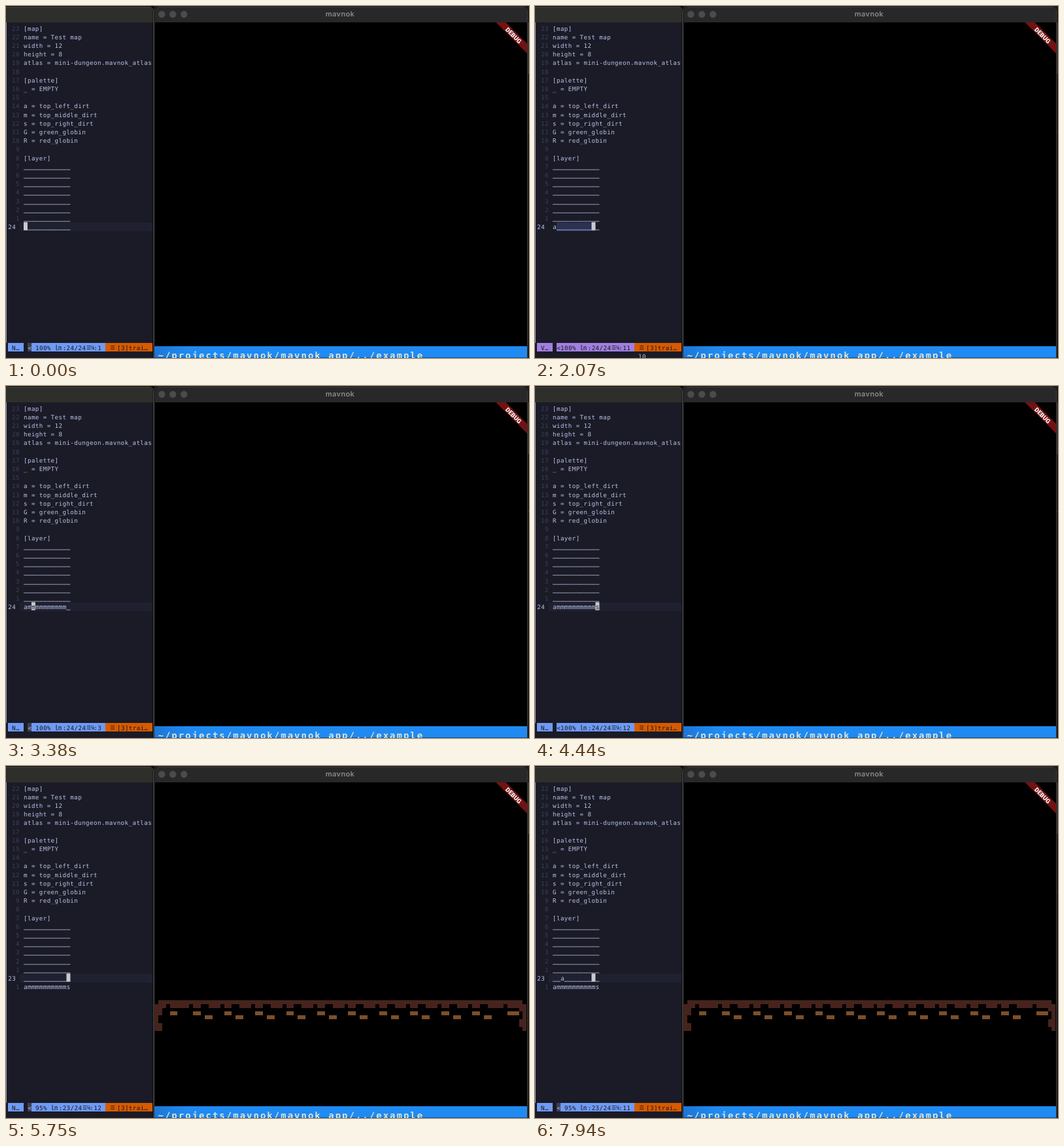
An HTML page for the animation above (8000 ms loop, 800x538 px).

```html
<!DOCTYPE html>
<html lang="en">
<head>
<meta charset="utf-8">
<style>
  html, body { margin: 0; width: 100%; height: 100%; overflow: hidden; background: #08080a; }
  svg { display: block; width: 800px; height: 538px; }
  text { white-space: pre; text-rendering: geometricPrecision; }
  .code { font: 9.2px "DejaVu Sans Mono", monospace; letter-spacing: .413px; }
  .cells { font: 9.92px "Noto Sans Mono", monospace; }
  .icon { font: 8px "DejaVu Sans Mono", monospace; }
  .wide { font: 10.5px "Noto Sans CJK JP", "Noto Sans CJK", sans-serif; }
  .title { font: 600 11px Inter, sans-serif; letter-spacing: .35px; }
  .flag { font: 900 9.4px Roboto, sans-serif; }
  .path { font: bold 14px "DejaVu Sans Mono", monospace; letter-spacing: 2px; }
</style>
</head>
<body>
<svg id="stage" viewBox="0 0 800 538">
  <linearGradient id="strip">
    <stop offset="0" stop-color="#1c76d6"/>
    <stop offset=".09" stop-color="#1f8af2"/>
  </linearGradient>
</svg>
<script>
const LOOP = 8000, CELL = 5.952, LINE = 13.2, LEFT = 27, COLS = 12;
const INK = '#b9c2ea', DIM = '#3b4060', BLUE = '#6f9af5', PURPLE = '#a17fe0', DARK = '#15161e';
const NS = 'http://www.w3.org/2000/svg';
const stage = document.getElementById('stage');

function add(tag, attrs, text, parent = stage) {
  const el = document.createElementNS(NS, tag);
  set(el, attrs);
  if (text !== undefined) el.textContent = text;
  return parent.appendChild(el);
}
function set(el, attrs) {
  for (const k in attrs) el.setAttribute(k, attrs[k]);
}
const box = (x, y, width, height, fill, parent) =>
  add('rect', { x, y, width, height, fill }, undefined, parent);
const label = (x, y, text, fill = INK, cls = 'code') =>
  add('text', { x, y, fill, class: cls }, text);
const baseline = row => 37.6 + row * LINE;
const colX = col => LEFT + (col - 1) * CELL;

// Editor window
add('path', { d: 'M0 1.5H219Q224.5 1.5 224.5 7V25H0Z', fill: '#2e2f2b' });
add('path', { d: 'M0 1.5H219Q225.5 1.5 225.5 8V538', fill: 'none', stroke: '#444446' });
box(0, 25, 224, 513, '#1a1b26');
box(0, 25, 1, 490, '#8f98c0');

const lineBg = box(21, 0, 203, LINE, '#1f2130');
const selection = box(colX(2), 0, 0, LINE, '#2b3150');
const BLANK = '_'.repeat(COLS);
const lines = [
  '[map]', 'name = Test map', 'width = 12', 'height = 8',
  'atlas = mini-dungeon.mavnok_atlas', '', '[palette]', '_ = EMPTY', '',
  'a = top_left_dirt', 'm = top_middle_dirt', 's = top_right_dirt',
  'G = green_globin', 'R = red_globin', '', '[layer]',
  ...Array(8).fill(BLANK)
];
const rows = lines.map((line, i) => ({
  num: label(0, baseline(i), ''),
  text: label(LEFT, baseline(i), line, INK, line === BLANK ? 'cells' : 'code')
}));
const cursor = box(0, 0, CELL, 12.2, '#c8cacf');
const under = label(0, 0, '', DARK, 'cells');

// Status line
const modeBox = box(3, 515, 24, 13, BLUE);
const mode = label(9, 525.6, '', DARK);
box(33, 515, 20, 13, '#3b4058');
const infoBox = box(0, 515, 0, 13, BLUE);
const arrow = label(33.5, 525.6, '<');
const percent = label(0, 525.6, '', DARK);
const lineIcon = label(0, 525.6, '㏑', DARK, 'wide');
const lineNo = label(0, 525.6, '', DARK);
const glyphs = label(0, 525, '☰℅', DARK, 'icon');
const place = label(0, 525.6, '', DARK);
box(152, 515, 72, 13, '#d75a00');
label(159.5, 525, '☰', DARK, 'icon');
label(170, 525.6, '[3]trai…', DARK);
const count = label(158, 539, '10', INK);

// Preview window
box(226, 0, 574, 538, '#1a1a1b');
add('path', { d: 'M227 538V8Q227 1.5 234 1.5H791Q797.5 1.5 797.5 8V538', fill: '#000', stroke: '#3c3c3e' });
add('path', { d: 'M228 25V8Q228 2 234 2H791Q797 2 797 8V25Z', fill: '#282829' });
[238.3, 255.2, 272.2].forEach(cx => add('circle', { cx, cy: 12.8, r: 5.2, fill: '#4b4b4c' }));
add('text', { x: 511, y: 16, fill: '#8a8a8b', class: 'title', 'text-anchor': 'middle' }, 'mavnok');
box(797, 25, 3, 79, '#343436');
box(797, 191, 3, 1, '#343436');
add('path', { d: 'M749.4 25H764.6L797 57.4V72.6Z', fill: '#731212' });
add('text', { transform: 'translate(776.3 45) rotate(45)', y: 3.3, fill: '#fff', class: 'flag', 'text-anchor': 'middle' }, 'DEBUG');

// Tiles are 8 x 8 blocks; runs are [row, first, last]
const TILE = 569.6 / 12, PX = TILE / 8;
const dirt = add('g', { 'shape-rendering': 'crispEdges' });
const tiles = {
  a: {
    edge: [[0, 1, 7], [1, 0, 2], [1, 4, 7], [2, 0, 1], [3, 0, 1], [4, 0, 0], [5, 0, 0], [6, 0, 1], [7, 0, 1]],
    fleck: [[3, 4, 5]]
  },
  m: {
    edge: [[0, 0, 7], [1, 0, 0], [1, 2, 3], [1, 6, 7]],
    fleck: [[3, 2, 3], [4, 5, 6]]
  },
  s: {
    edge: [[0, 0, 6], [1, 0, 1], [1, 3, 7], [2, 6, 7], [3, 7, 7], [4, 7, 7], [5, 6, 7], [6, 6, 7], [7, 7, 7]],
    fleck: [[3, 3, 5]]
  }
};
const GROUND = 'a' + 'm'.repeat(10) + 's';
[...GROUND].forEach((key, i) => {
  const draw = (runs, fill) => runs.forEach(([r, from, to]) =>
    box(226.8 + i * TILE + from * PX, 25.4 + 7 * TILE + r * PX, (to - from + 1) * PX, PX, fill, dirt));
  draw(tiles[key].edge, '#46241d');
  draw(tiles[key].fleck, '#7b4f2b');
});

// Shell strip
box(227, 520, 570, 17.6, 'url(#strip)');
label(232.5, 539.2, '~/projects/mavnok/mavnok_app/../example', '#dde3da', 'path');

// One step on key press, then steady repeats after a delay
function held(t, start, delay, rate, steps) {
  if (t < start) return 0;
  if (t < start + delay) return 1;
  return Math.min(steps, 2 + Math.floor((t - start - delay) / rate));
}

function stateAt(t) {
  const s = { row: 23, col: 1, visual: false, ground: BLANK, ledge: BLANK };
  if (t >= 630) s.ground = 'a' + BLANK.slice(1);
  if (t >= 940) s.col = 2;
  if (t >= 1190) {
    s.visual = t < 2690;
    s.col = 2 + held(t, 1380, 220, 60, 9);
  }
  if (t >= 2690) {
    s.ground = 'a' + 'm'.repeat(10) + '_';
    s.col = 2 + held(t, 3250, 200, 62, 10);
  }
  if (t >= 4310) s.ground = GROUND;
  if (t >= 5440) {
    s.row = 22;
    s.col = 12 - held(t, 5880, 250, 62, 9);
  }
  if (t >= 7070) {
    s.ledge = '__a' + BLANK.slice(3);
    s.col = 3 + held(t, 7250, 220, 62, 8);
  }
  return s;
}

function renderStatus(s) {
  const color = s.visual ? PURPLE : BLUE;
  const line = s.row + 1;
  const pct = Math.floor(line / 24 * 100) + '%';
  const pos = ':' + s.col;
  const end = 146.2 - pos.length * CELL;
  const lineX = end - 8 * CELL;
  const start = lineX - (pct.length + 3) * CELL;
  const full = start < 42;
  const from = full ? 33 : start - CELL;
  percent.textContent = pct;
  lineNo.textContent = ':' + line + '/24';
  place.textContent = pos;
  mode.textContent = s.visual ? 'V…' : 'N…';
  set(percent, { x: start });
  set(lineIcon, { x: lineX - 2 * CELL });
  set(lineNo, { x: lineX });
  set(glyphs, { x: end - 2 * CELL + .6 });
  set(place, { x: end });
  set(modeBox, { fill: color });
  set(infoBox, { x: from, width: 152 - from, fill: color });
  set(arrow, { fill: full ? DARK : INK });
  count.textContent = s.visual ? s.col - 1 : '';
}

function render(t) {
  const s = stateAt(t), top = baseline(s.row) - 7 + .2 * (s.row - 23) - .2;
  rows[23].text.textContent = s.ground;
  rows[22].text.textContent = s.ledge;
  rows.forEach(({ num }, i) => {
    const here = i === s.row;
    const n = String(here ? i + 1 : Math.abs(i - s.row));
    num.textContent = n;
    set(num, { x: here ? 3.2 : 21 - n.length * CELL, fill: here ? INK : DIM });
  });

  const bandY = baseline(s.row) - 10.2;
  set(lineBg, { y: bandY, width: s.visual ? 0 : 203 });
  set(selection, { y: bandY, width: s.visual ? (s.col - 1) * CELL : 0 });
  set(cursor, { x: colX(s.col), y: bandY - .6 });
  const ch = (s.row === 23 ? s.ground : s.ledge)[s.col - 1];
  under.textContent = ch === '_' ? '' : ch;
  set(under, { x: colX(s.col), y: baseline(s.row) });
  renderStatus(s);
  dirt.style.display = t >= 5060 ? '' : 'none';
}

function tick() {
  render(performance.now() % LOOP);
  requestAnimationFrame(tick);
}
tick();
</script>
</body>
</html>
```
